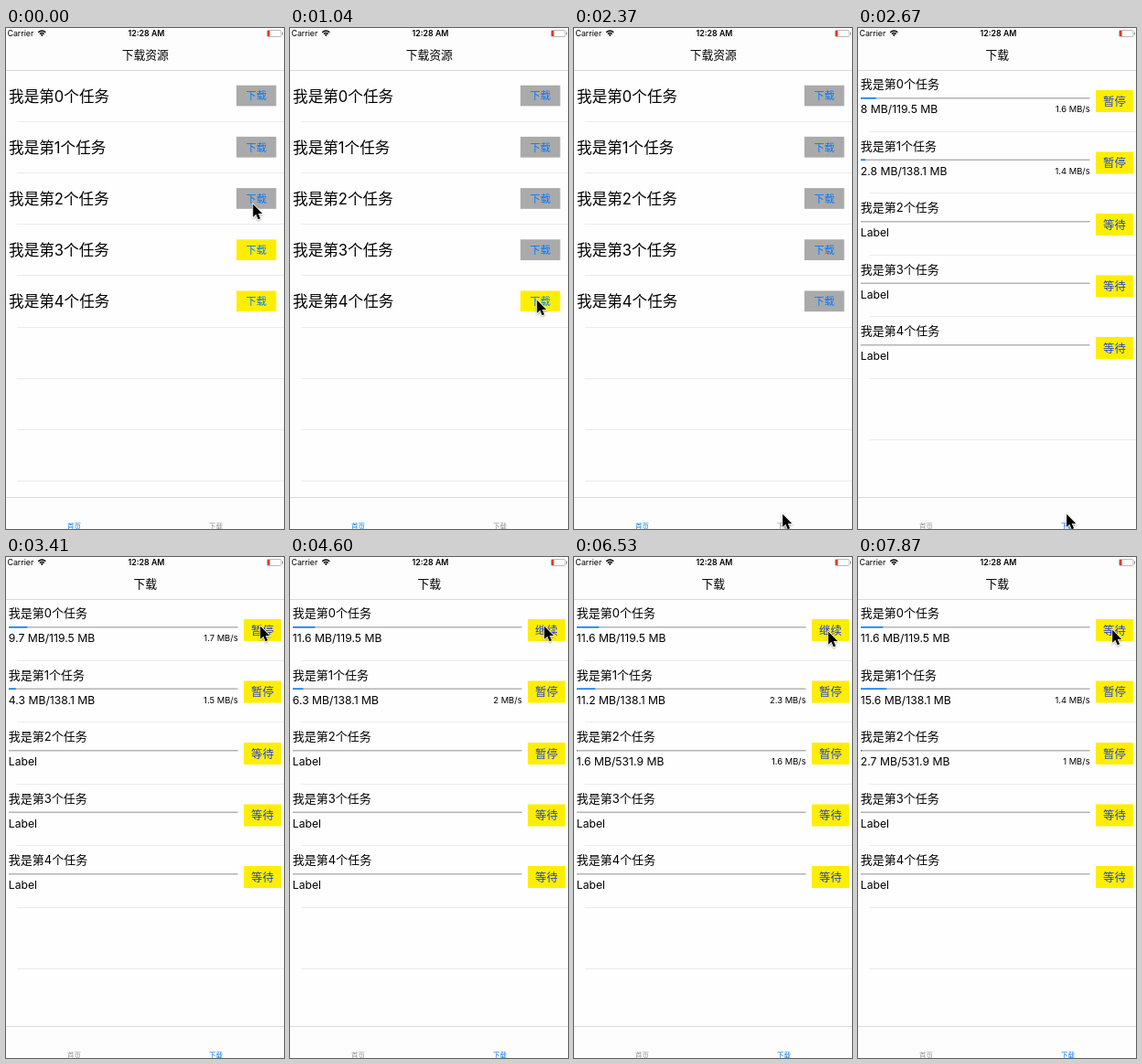
An HTML page that plays this animation: 304x548 px, repeating every 8 s.

```html
<!DOCTYPE html>
<html lang="zh-CN">
<head>
<meta charset="utf-8">
<style>
html, body { margin: 0; width: 100%; height: 100%; overflow: hidden; background: #fefefe; }
svg { display: block; width: 304px; height: 548px; font-family: Inter, "Noto Sans CJK SC", "Noto Sans CJK", sans-serif; }
text { white-space: pre; }
</style>
</head>
<body>
<svg viewBox="0 0 304 548">
  <g id="page"></g>
  <path id="cursor" d="M1.2.8V14.8L4.4 11.8 6.7 17.3 9.1 16.3 6.8 11H11.3Z" stroke="#fff" stroke-width="1.4"
    paint-order="stroke" style="filter:drop-shadow(0 1px 1px #0005)"/>
</svg>
<script>
const LOOP = 8000, TICK = 148.5, SWITCH = 18;
const BLUE = '#007aff', YELLOW = '#ffee00';

// Times below are in ticks. Buttons of the first page turn grey at these ticks.
const started = [0, 0, 0, 4, 9];

// log: [tick, megabytes, speed]; button: [tick, label]
const tasks = [
  { total: 119.5, log: [[18, 8, '1.6'], [19, 9.7, '1.7'], [25, 11.6, '1.9'], [31, 11.6, '']],
    button: [[0, '暂停'], [31, '继续'], [52, '等待']] },
  { total: 138.1, log: [[18, 2.8, '1.4'], [20, 4.3, '1.5'], [26, 6.3, '2'], [33, 8.9, '2.6'],
    [39, 11.2, '2.3'], [46, 14.2, '3'], [53, 15.6, '1.4']], button: [[0, '暂停']] },
  { total: 531.9, log: [[34, 0, ''], [40, 1.6, '1.6'], [47, 2.7, '1']],
    button: [[0, '等待'], [31, '暂停']] },
  { log: [], button: [[0, '等待']] },
  { log: [], button: [[0, '等待']] }
];

// tick, x, y
const path = [[0, 269, 192], [2, 269, 245], [4, 269, 245], [7, 269, 297], [9, 269, 297],
  [16, 227, 531], [18, 227, 531], [20, 254, 97], [22, 254, 97], [23, 277, 75], [32, 277, 75],
  [35, 276, 77], [38, 276, 77], [40, 277, 79], [43, 277, 79], [44, 277, 81], [48, 277, 81],
  [49, 277, 79], [60, 277, 79]];

const rect = (x, y, w, h, fill) => `<rect x="${x}" y="${y}" width="${w}" height="${h}" fill="${fill}"/>`;
const text = (s, x, y, size, fill = '#000', anchor = 'start', weight = 400) =>
  `<text x="${x}" y="${y}" font-size="${size}" fill="${fill}" text-anchor="${anchor}" font-weight="${weight}">${s}</text>`;
const latest = (list, n) => list.filter(e => e[0] <= n).pop();

function lines(step, count) {
  let out = '';
  for (let k = 1; k <= count; k++) out += rect(12, Math.floor(46.25 + step * k), 292, 1, '#ebebed');
  return out;
}

function bars(title, tab) {
  const color = i => i === tab ? BLUE : '#929292';
  return rect(0, 0, 304, 46, '#fdfdfd') + rect(0, 46, 304, 1, '#dadada') +
    rect(0, 513, 304, 35, '#fdfdfd') + rect(0, 513, 304, 1, '#dadada') +
    text('Carrier', 1.5, 9, 8.8) + text('12:28 AM', 153.5, 9, 8.8, '#000', 'middle', 600) +
    '<path d="M35.2 4.8Q39.3 1.2 43.4 4.8M36.8 6.6Q39.3 4.4 41.8 6.6" fill="none" stroke="#000" stroke-width="1.3"/>' +
    '<path d="M37.8 7.6Q39.3 6.4 40.8 7.6L39.3 9.2Z"/>' +
    '<rect x="285.5" y="2.5" width="15.5" height="7" rx="1.3" fill="none" stroke="#aaa" stroke-width=".8"/>' +
    rect(302, 4.5, 1, 3, '#999') + rect(286, 3, 2.5, 6, '#ff2d20') +
    text(title, 152.3, 34.3, 12.8, '#000', 'middle', 500) +
    text('首页', 74.5, 547.8, 7.5, color(0), 'middle') + text('下载', 229.5, 547.8, 7.5, color(1), 'middle');
}

function homePage(n) {
  return lines(56.17, 8) + started.map((start, i) => {
    const y = 56.2 * i;
    return text(`我是第${i}个任务`, 3.1, 80.6 + y, 16.6) +
      rect(252, 62.7 + y, 43.5, 22.7, n >= start && (start || i < 3) ? '#aaa' : YELLOW) +
      text('下载', 273.8, 78.4 + y, 11.2, BLUE, 'middle');
  }).join('') + bars('下载资源', 0);
}

function taskPage(n) {
  return lines(67.36, 6) + tasks.map(({ total, log, button }, i) => {
    const y = 67.5 * i, state = latest(log, n);
    const [, done, speed] = state || [0, 0, ''];
    return text(`我是第${i}个任务`, 2.8, 66.4 + y, 13) +
      rect(3, 76 + y, 250.5, 1.5, '#b4b4b4') +
      (done ? rect(3, 76 + y, 250.5 * done / total, 1.5, BLUE) : '') +
      text(state ? `${done} MB/${total} MB` : 'Label', 2.8, 93.2 + y, 12.2) +
      (speed && text(speed + ' MB/s', 253.6, 92 + y, 9.4, '#000', 'end')) +
      rect(260, 68 + y, 41, 24, YELLOW) +
      text(latest(button, n)[1], 280.5, 84.5 + y, 12.4, '#1a40e0', 'middle');
  }).join('') + bars('下载', 1);
}

function cursorAt(n) {
  const i = path.findIndex(p => p[0] > n);
  const [t0, x0, y0] = path[i - 1], [t1, x1, y1] = path[i];
  const u = (n - t0) / (t1 - t0), k = u * u * (3 - 2 * u);
  return [x0 + (x1 - x0) * k, y0 + (y1 - y0) * k].map(Math.round);
}

const page = document.getElementById('page'), cursor = document.getElementById('cursor');
const origin = performance.now();
let shown = -1;

function draw() {
  const t = (performance.now() - origin) % LOOP;
  const n = Math.floor((t + 8) / TICK);
  if (n !== shown) {
    shown = n;
    page.innerHTML = n < SWITCH ? homePage(n) : taskPage(n);
    cursor.setAttribute('transform', `translate(${cursorAt(n)})`);
  }
  requestAnimationFrame(draw);
}
draw();
</script>
</body>
</html>
```
